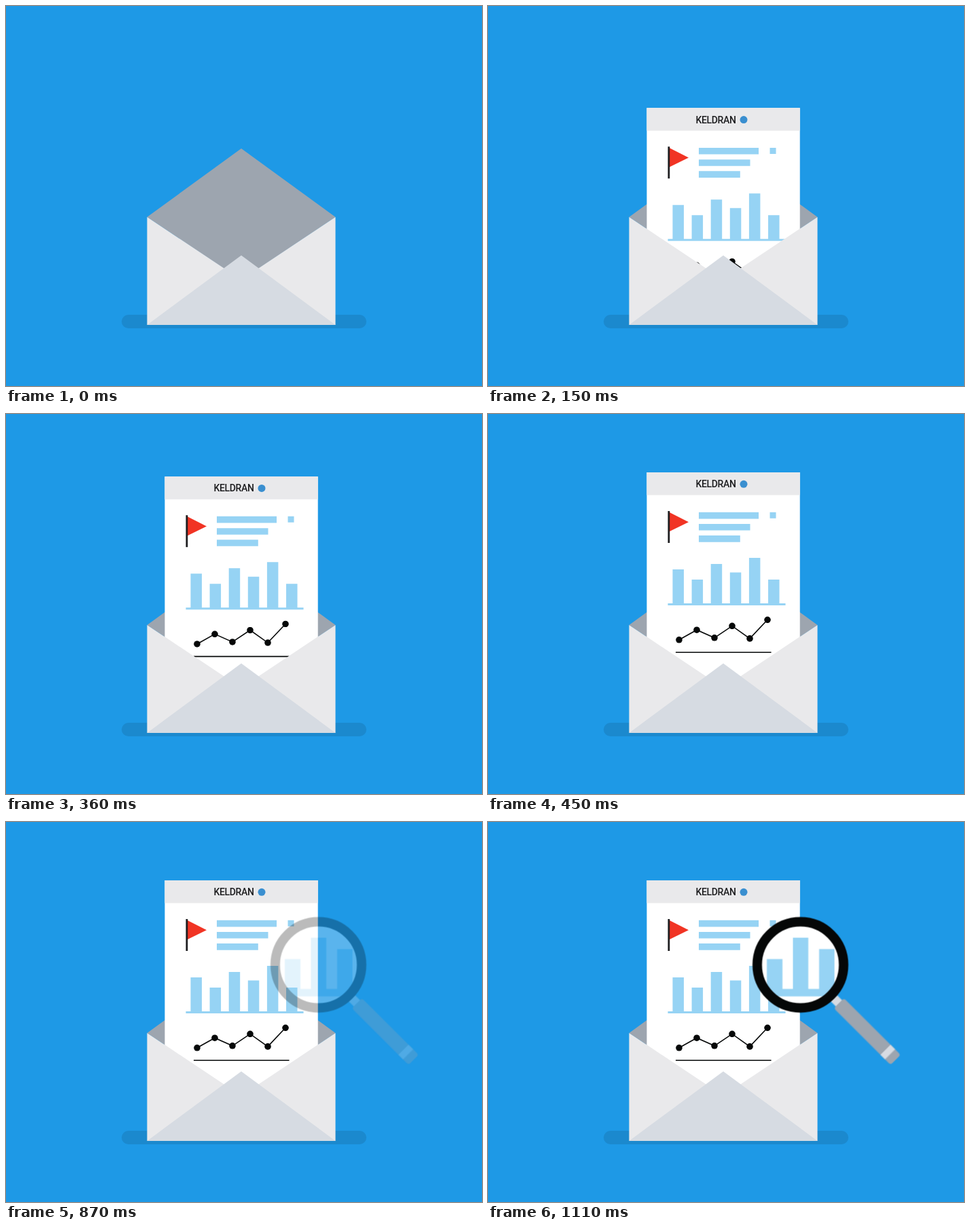
Write an HTML page without scripts that moves like this. It is 700 by 560 pixels and loops after 4.5 s.

```html
<!DOCTYPE html>
<html lang="en">
<head>
<meta charset="utf-8">
<title>Report by mail</title>
<style>
  @property --step {
    syntax: "<number>";
    inherits: false;
    initial-value: 0;
  }
  html, body {
    margin: 0;
    width: 100%;
    height: 100%;
    overflow: hidden;
    background: #1e99e6;
  }
  svg { display: block; width: 100%; height: 100%; }

  .light { fill: #e9e9eb; }
  .pale { fill: #d6dbe2; }
  .grey { fill: #9da5af; }
  .data { fill: #96d3f4; }
  .ink { fill: none; stroke: #060808; stroke-width: 1.6; }
  .brand { font: 500 14px Roboto, sans-serif; letter-spacing: -.35px; fill: #1d1d1f; }

  /* The sheet decays exponentially towards its resting place. */
  .sheet {
    transform: translateY(calc(337px * exp(-.32 * var(--step)) - 3.82px));
    animation: rise 4500ms -2ms infinite;
  }
  @keyframes rise {
    0% { --step: 0; animation-timing-function: steps(5, end); }
    3.3333% { --step: 5; animation-timing-function: step-end; }
    4% { --step: 5; animation-timing-function: steps(9, end); }
    10%, 100% { --step: 14; }
  }

  .magnifier { animation: appear 4500ms -2ms infinite; }
  @keyframes appear {
    0%, 17.3333% { opacity: 0; animation-timing-function: steps(11, end); }
    24.6667%, 100% { opacity: 1; }
  }
</style>
</head>
<body>
<svg viewBox="0 0 700 560">
  <defs>
    <clipPath id="pocket"><path d="M200 0H500V460H200Z"/></clipPath>
    <clipPath id="glass"><circle r="57"/></clipPath>
    <marker id="dot" markerUnits="userSpaceOnUse" markerWidth="10" markerHeight="10" refX="5" refY="5">
      <circle cx="5" cy="5" r="4.8" fill="#060808"/>
    </marker>
  </defs>

  <rect x="170" y="455" width="360" height="20" rx="10" fill="#1b89ce"/>
  <path class="grey" d="M346 210L484.5 311L346 404L207.5 311Z"/>

  <g clip-path="url(#pocket)">
    <g class="sheet">
      <path fill="#fff" d="M233.5 86H458.7V460H233.5Z"/>
      <path class="light" d="M233.5 86H458.7V119.5H233.5Z"/>
      <text class="brand" x="305.5" y="108.3">KELDRAN</text>
      <circle cx="376" cy="103.3" r="5.5" fill="#3a8fd0"/>

      <path fill="#f13424" d="M267 145L295 159.3L267 173Z"/>
      <path fill="#1d1d1f" d="M264.5 143H267.3V190H264.5Z"/>
      <path class="data" d="M310 144.7h88v9.7h-88z M310 162h75.5v9.6h-75.5z M310 179h60.8v9.7h-60.8z M414.5 144.7h9v9h-9z"/>

      <path class="data" d="M271.5 229h16.5v50h-16.5z M299.6 244h16.5v35h-16.5z M327.7 221h16.5v58h-16.5z
        M355.8 233.5h16.5v45.5h-16.5z M383.9 212h16.5v67h-16.5z M412 244h16.5v35h-16.5z
        M264.5 279h173v3h-173z"/>

      <polyline class="ink" points="281,332.8 307,318.2 333,329.8 359,312.4 385,330.9 411,303.3"
        marker-start="url(#dot)" marker-mid="url(#dot)" marker-end="url(#dot)"/>
      <path class="ink" d="M276 351.2H416.5"/>
    </g>
  </g>

  <path class="light" d="M207.5 311L346 403.5L484.5 311V470H207.5Z"/>
  <path class="pale" d="M346 367.5L484.5 470H207.5Z"/>

  <g class="magnifier" transform="translate(459.4 210.5)">
    <g transform="rotate(45)">
      <rect class="pale" x="66" y="-6.5" width="20" height="13"/>
      <rect class="grey" x="80" y="-10.5" width="118" height="21" rx="4"/>
      <rect class="pale" x="177" y="-10.5" width="9.5" height="21"/>
    </g>
    <circle r="58" fill="#fff"/>
    <path class="data" clip-path="url(#glass)"
      d="M-49.4 -8.5h23v50h-23z M-11 -40h22.6v80h-22.6z M27.5 -23.3h22.6v65h-22.6z M-60 35.5H60V46.5H-60z"/>
    <circle r="63.5" fill="none" stroke="#050707" stroke-width="14"/>
  </g>
</svg>
</body>
</html>
```
